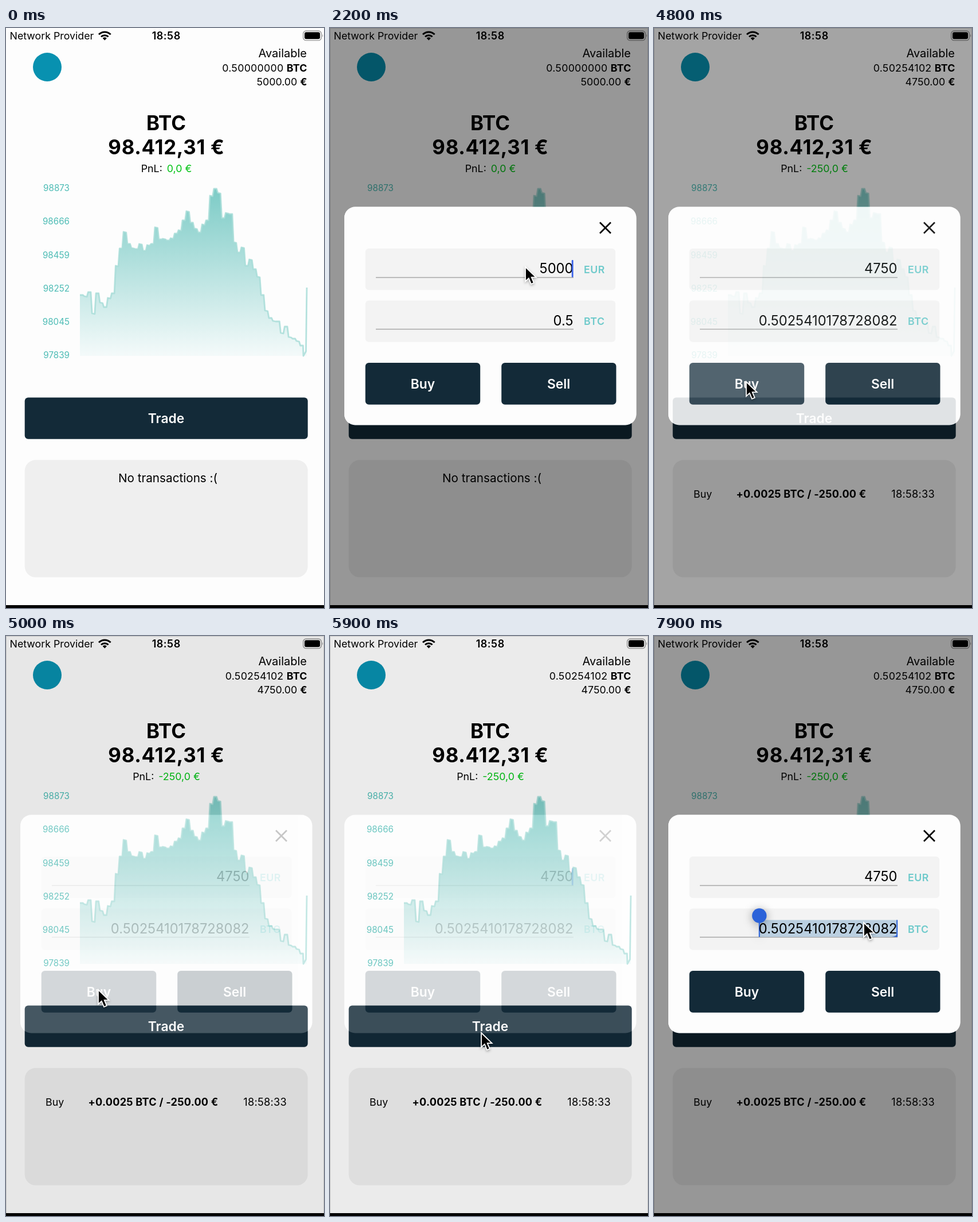
Recreate the animation shown at these times as an HTML page. Size 555 by 1010 pixels, loop 8 s.

```html
<!DOCTYPE html>
<html lang="en">
<head>
<meta charset="utf-8">
<title>Trading app</title>
<style>
  html, body { margin: 0; width: 100%; height: 100%; overflow: hidden; background: #fdfdfd; }
  svg { display: block; width: 555px; height: 1010px; }
  text { font: 17.8px Inter, "Liberation Sans", sans-serif; fill: #000; white-space: pre; }
  .mid { text-anchor: middle; }
  .end { text-anchor: end; }
  .b { font-weight: 700; }
  .big { font-size: 34.8px; font-weight: 700; }
  .m { font-size: 20.7px; }
  .axis { font-size: 15.2px; fill: #4dbcb5; }
  .btn { font-size: 22.8px; font-weight: 600; fill: #fdfdfd; }
  .val { font-size: 23.7px; }
  .unit { font-weight: 600; fill: #6ecacb; letter-spacing: .5px; }
  .loose { letter-spacing: .25px; }
  .field { fill: #f3f3f3; }
  .rule { stroke: #a6a6a6; stroke-width: 1.3; }
  #knob { filter: drop-shadow(0 2px 8px rgba(0, 0, 0, .35)); }
  #pointer { filter: drop-shadow(0 2px 2px rgba(0, 0, 0, .3)); }
</style>
</head>
<body>
<svg viewBox="0 0 555 1010">
  <defs>
    <linearGradient id="shade" x1="0" y1="279" x2="0" y2="571" gradientUnits="userSpaceOnUse">
      <stop stop-color="#7ccbc6"/>
      <stop offset="1" stop-color="#f4fafa"/>
    </linearGradient>
    <mask id="around" maskUnits="userSpaceOnUse" x="0" y="0" width="555" height="1010">
      <rect width="555" height="1010" fill="#fff"/>
      <rect x="25" y="311.5" width="509.5" height="380" rx="19"/>
    </mask>
  </defs>
  <rect width="555" height="1010" fill="#fdfdfd"/>

  <!-- status bar -->
  <text x="6.5" y="20">Network Provider</text>
  <g fill="none" stroke="#000" stroke-width="3">
    <path d="M162 11.2a14.5 14.5 0 0 1 20.6 0M166 15.2a9 9 0 0 1 12.6 0"/>
  </g>
  <path d="M172.3 21.5l-3.6-3.7a5.2 5.2 0 0 1 7.2 0z"/>
  <text class="mid" x="279.7" y="20" style="font-size:18px;font-weight:600;letter-spacing:.5px">18:58</text>
  <rect x="518.7" y="5" width="31.6" height="16.6" rx="5" fill="none" stroke="#999" stroke-width="1.4"/>
  <rect x="521" y="7.3" width="27" height="12" rx="3"/>
  <path d="M552 10.5q2.4 2.8 0 5.6z" fill="#999"/>

  <!-- header -->
  <circle cx="72" cy="68" r="25" fill="#0891b0"/>
  <text class="end" x="525" y="51" style="font-size:20px">Available</text>
  <text class="end loose" x="525.7" y="75.5"><tspan id="coins"></tspan> <tspan class="b">BTC</tspan></text>
  <text class="end" x="525.5" y="99.5"><tspan id="cash"></tspan> <tspan class="b">€</tspan></text>
  <text class="mid big" x="279.5" y="177.5">BTC</text>
  <text class="mid big" x="280" y="220" style="letter-spacing:.7px">98.412,31 €</text>
  <text class="mid" x="280" y="251">PnL: <tspan id="pnl" dx="3" fill="#00c314"></tspan></text>

  <g id="axis"></g>
  <path id="area" fill="url(#shade)"/>
  <path id="line" fill="none" stroke="#a6dcd8" stroke-opacity=".8" stroke-width="2.8" stroke-linejoin="round"/>

  <rect id="trade" x="32.7" y="643.5" width="494" height="72.3" rx="6"/>
  <text class="mid btn" x="279.5" y="688">Trade</text>
  <rect x="32.7" y="752.3" width="494" height="204.3" rx="19" fill="#efefef"/>
  <text id="empty" class="mid m" x="282.5" y="791">No transactions :(</text>
  <g id="entry">
    <text x="69" y="818">Buy</text>
    <text class="mid b loose" x="257" y="818" style="font-size:18.1px">+0.0025 BTC / -250.00 €</text>
    <text class="end loose" x="490" y="818" style="font-size:18.2px">18:58:33</text>
  </g>

  <rect id="dim" width="555" height="1005" mask="url(#around)"/>

  <g id="modal">
    <rect x="25" y="311.5" width="509.5" height="380" rx="19" fill="#fdfdfd"/>
    <path d="M471 338.5l19 19m0-19l-19 19" stroke="#000" stroke-width="2.7"/>
    <rect class="field" x="61.7" y="384" width="436.5" height="72.3" rx="6"/>
    <rect class="field" x="61.7" y="474.5" width="436.5" height="72.3" rx="6"/>
    <path class="rule" d="M80 434.5H425M80 524.5H425"/>
    <g id="select">
      <rect id="mark" y="494.5" height="29.5" fill="#bacfe0"/>
      <path d="M414 524q8-.5 11-5v5z" fill="#2b62d9"/>
      <rect x="423.2" y="494.5" width="2" height="29.5" fill="#2b62d9"/>
      <g id="knob" fill="#2b62d9">
        <rect x="-1" y="494.5" width="2" height="29.5"/>
        <circle cy="487" r="12.7"/>
      </g>
    </g>
    <text id="eur" class="end val" x="424.5" y="427"></text>
    <text id="btc" class="end val" x="424.5" y="517.7"></text>
    <rect id="caret" x="421.8" width="2.8" height="30" rx="1" fill="#3b63e8"/>
    <text class="unit" x="443" y="426.5">EUR</text>
    <text class="unit" x="443" y="516.7">BTC</text>
    <rect id="buy" x="61.7" y="583" width="200.5" height="72.7" rx="6"/>
    <rect x="299.2" y="583" width="200.3" height="72.7" rx="6" fill="#132a38"/>
    <text class="mid btn" x="162" y="628">Buy</text>
    <text class="mid btn" x="399" y="628">Sell</text>
  </g>

  <rect y="1005" width="555" height="5"/>
  <rect id="edge" x=".5" y=".5" width="554" height="1009" fill="none" stroke="#000" stroke-opacity=".15"/>
  <path id="pointer" d="M0 0V25.2L5.8 19.8L10 29.8L14.8 27.8L10.7 18.2H18.6Z" stroke="#fff" stroke-width="1.8"/>
</svg>
<script>
const $ = id => document.getElementById(id);
const set = (id, name, value) => $(id).setAttribute(name, value);
const show = (id, on) => { $(id).style.display = on ? '' : 'none'; };
const write = (id, s) => { if ($(id).textContent !== s) $(id).textContent = s; };
const clamp = v => Math.min(1, Math.max(0, v));
const within = (t, a, b) => t >= a && t < b;

const LOOP = 8000, FADE = 300, RATE = 98385.75;
const OPEN = 1098, CLOSE = 4764, REOPEN = 5850, FOCUS_BTC = 7000;
const TYPED = [[3200, '4'], [3400, '47'], [3600, '475'], [3800, '4750']];

// pointer stops: time, x, y
const STOPS = [
  [100, 483, 894], [600, 383, 681], [1500, 383, 681], [2200, 341, 416],
  [2550, 396, 415], [4000, 396, 415], [4500, 161, 616], [5100, 161, 616],
  [5500, 264, 691], [5950, 264, 691], [6400, 355, 465], [6900, 366, 499], [8000, 366, 499]
];

// price steps as heights on the stage
const STEPS = [
  465, 467, 460, 497, 462, 478, 486, 470, 462, 414, 384, 355, 376, 383, 385, 376, 388, 378, 376,
  347, 368, 367, 370, 366, 358, 352, 335, 319, 339, 349, 356, 342, 335, 292, 280, 287, 331, 322,
  324, 373, 391, 382, 414, 403, 420, 433, 465, 492, 505, 510, 511, 531, 520, 538, 541, 545, 553
];

function drawChart() {
  const w = 6.86;
  const pts = STEPS.map((y, i) => {
    const x = 129 + i * w;
    return `${x + (i ? .6 : 0)} ${y}L${x + w - 1.6} ${y + (i % 2)}`;
  });
  const d = `M${pts.join('L')}L519 571L523.5 563L525 452`;
  set('line', 'd', d);
  set('area', 'd', d + 'V571H129Z');
  $('axis').innerHTML = [98873, 98666, 98459, 98252, 98045, 97839].map((v, i) =>
    `<text class="end axis" x="111" y="${284.3 + i * 58.1}">${v}</text>`).join('');
}

function movePointer(t) {
  show('pointer', t >= 100);
  const i = STOPS.findIndex(s => s[0] > t);
  if (i < 1) return;
  const [t0, x0, y0] = STOPS[i - 1], [t1, x1, y1] = STOPS[i];
  let k = (t - t0) / (t1 - t0);
  k = k * k * (3 - 2 * k);
  set('pointer', 'transform', `translate(${x0 + (x1 - x0) * k} ${y0 + (y1 - y0) * k})`);
}

function caretAlpha(t) {
  const selecting = within(t, 2700, 3200) || t >= 7300;
  if (selecting || within(t, 4600, REOPEN)) return 0;
  if (within(t, 3200, 4000)) return 1;
  const start = t >= FOCUS_BTC ? FOCUS_BTC : t >= REOPEN ? REOPEN : t >= 4000 ? 4000 : OPEN;
  const p = (t - start) % 1000;
  return p < 500 ? 1 : p < 900 ? clamp((570 - p) / 70) : (p - 900) / 100;
}

function drawSelection(t) {
  const first = within(t, 2700, 3200), on = first || t >= 7300;
  show('select', on);
  if (!on) return;
  const width = $(first ? 'eur' : 'btc').getComputedTextLength(), left = 424.5 - width;
  set('select', 'transform', `translate(0 ${first ? -90.5 : 0})`);
  set('mark', 'x', left);
  set('mark', 'width', width);
  set('knob', 'transform', `translate(${left + 1} 0)`);
}

function render(t) {
  const bought = t >= CLOSE;
  write('coins', bought ? '0.50254102' : '0.50000000');
  write('cash', bought ? '4750.00' : '5000.00');
  write('pnl', bought ? '-250,0 €' : '0,0 €');
  show('empty', !bought);
  show('entry', bought);
  show('edge', t >= 900);

  const eur = TYPED.reduce((s, [at, text]) => t >= at ? text : s, '5000');
  write('eur', eur);
  write('btc', eur === '4750' ? '0.5025410178728082' : String(.5 + (5000 - eur) / RATE));

  const open = t < CLOSE ? clamp((t - OPEN) / FADE)
    : t < REOPEN ? clamp(1 - (t - CLOSE) / FADE) : clamp((t - REOPEN) / FADE);
  set('dim', 'opacity', .4 * open);
  set('modal', 'opacity', open);

  const paint = (id, down) => set(id, 'fill', down ? '#3b4f5c' : '#132a38');
  paint('trade', within(t, 900, 1150) || within(t, 5600, REOPEN));
  paint('buy', within(t, 4600, CLOSE + FADE));

  set('caret', 'y', t >= FOCUS_BTC ? 494.5 : 404);
  set('caret', 'opacity', caretAlpha(t));
  drawSelection(t);
  movePointer(t);
}

drawChart();
const begin = performance.now();
function tick() {
  render((performance.now() - begin) % LOOP);
  requestAnimationFrame(tick);
}
tick();
</script>
</body>
</html>
```
